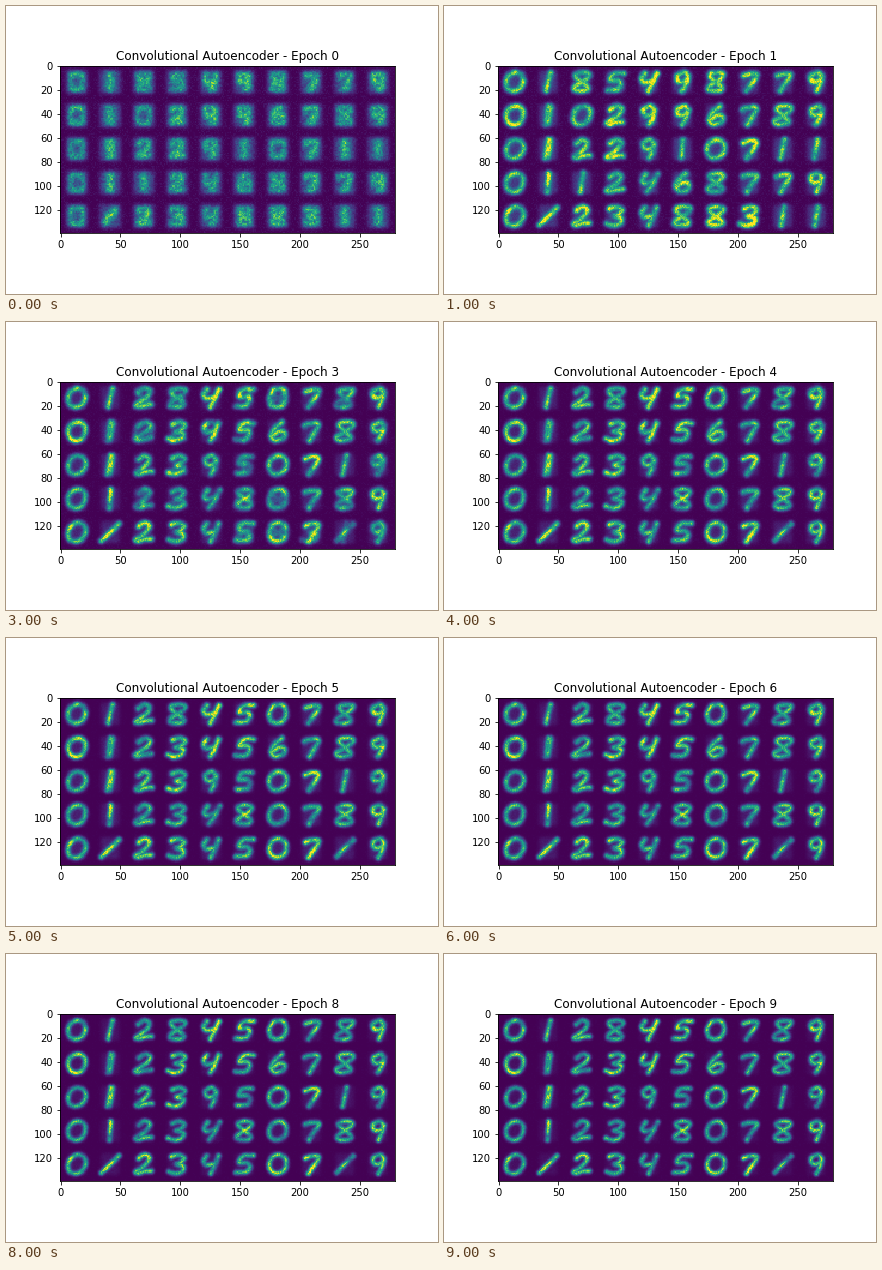
Animation, 432 px wide and 288 px high, one loop 10000 ms. Source, as a matplotlib script:

```python
import numpy as np
import matplotlib.pyplot as plt
from matplotlib.animation import FuncAnimation

CELL = 28
EPOCHS = 10
HALF_W, HALF_H = 7.2, 7.8  # half size of a digit's pen path, in cell pixels

# Shape read in each cell early and late in training ("I" is a bold one).
EARLY = ["0185498779", "0I02996789", "0I22910711", "0112468779", "0/23488311"]
LATE = ["0128450789", "0I23456789", "0I23950719", "0123480789", "0/234507/9"]

turn = np.linspace(0, 2 * np.pi, 25)
STROKES = {
    "0": [list(zip(np.sin(turn), -np.cos(turn)))],
    "1": [[(0, -1), (0, 1)]],
    "I": [[(-.12, -1), (-.12, 1)], [(.12, -1), (.12, 1)]],
    "/": [[(.8, -.9), (-.8, .9)]],
    "2": [[(-.7, -.6), (-.1, -1), (.55, -.7), (.35, -.1), (-.2, .4),
           (-.8, .85), (-.4, .95), (.2, .75), (1, .7)]],
    "3": [[(-.7, -.8), (0, -1), (.7, -.7), (.4, -.2), (-.1, 0)],
          [(-.1, 0), (.75, .25), (.6, .8), (-.1, 1), (-.9, .8)]],
    "4": [[(-.6, -.9), (-.85, -.3), (-.5, .05), (.2, 0), (.6, -.2)],
          [(.8, -.9), (.55, -.2), (.35, .4), (.1, 1)]],
    "5": [[(.9, -.9), (-.2, -.85), (-.6, -.2), (.3, -.15), (.7, .3),
           (.3, .85), (-.8, .9)]],
    "6": [[(.3, -1), (-.4, -.3), (-.7, .4), (-.2, .95), (.6, .8),
           (.8, .2), (.2, 0), (-.5, .4)]],
    "7": [[(-.8, -.65), (-.2, -.85), (.5, -.85), (.75, -.65), (.5, -.1),
           (.2, .4), (-.1, 1)]],
    "8": [list(zip(0.8 * np.sin(2 * turn), -np.cos(turn)))],
    "9": [[(.5, -.6), (0, -1), (-.7, -.6), (-.4, -.05), (.3, -.1),
           (.55, -.6), (.5, .2), (.2, 1)]],
}


def smooth(points, steps=14):
    """Catmull-Rom curve through the points."""
    p = np.array(points, float)
    p = np.vstack([2 * p[0] - p[1], p, 2 * p[-1] - p[-2]])
    t = np.linspace(0, 1, steps)[:, None]
    a, b, c, d = (p[k:len(p) - 3 + k, None] for k in range(4))
    curve = b + t * (c - a) / 2 + t**2 * (a - 2.5 * b + 2 * c - d / 2) \
        + t**3 * (1.5 * (b - c) + (d - a) / 2)
    return curve.reshape(-1, 2)


CURVES = {g: np.vstack([smooth(s) for s in strokes])
          for g, strokes in STROKES.items()}
yy, xx = np.mgrid[:CELL, :CELL] - (CELL - 1) / 2


def brush(glyph, slant, pen):
    """Ink left by a soft pen of the given radius along a slanted glyph."""
    x, y = CURVES[glyph].T
    px, py = x * HALF_W - slant * y * HALF_H, y * HALF_H
    dist = np.hypot(xx[..., None] - px, yy[..., None] - py).min(-1)
    return np.exp(-(dist / pen) ** 2)


def soft_box(w, h):
    def side(v, r):
        return 1 / (1 + np.exp(np.abs(v) - r))
    return side(xx, w) * side(yy, h)


def patches(rng, knots=7):
    """Smooth random field in 0..1 over one cell."""
    at, k = np.linspace(0, knots - 1, CELL), np.arange(knots)
    rows = np.array([np.interp(at, k, r) for r in rng.random((knots, knots))])
    return np.array([np.interp(at, k, c) for c in rows.T]).T


def cell_image(r, c, epoch):
    rng = np.random.default_rng(10 * r + c)
    gain, slant = rng.uniform(0.7, 1.0), rng.uniform(0.05, 0.25)
    tone, grain = patches(rng), rng.random((CELL, CELL))
    first, last = EARLY[r][c], LATE[r][c]

    if epoch == 0:
        blocks = np.kron(rng.random((14, 14)), np.ones((2, 2)))
        blob = brush(first, 0, 4) * soft_box(6.5, 8.5)
        level = 0.2 * soft_box(8.5, 9.5) + 0.5 * gain * blob
        return level * (0.6 + 0.4 * blocks + 0.4 * grain)

    late = np.interp(epoch, [1, 4], [0, 1])
    pen = np.interp(epoch, [1, 9], [2.5, 2.0])
    ink = (1 - late) * brush(first, slant, pen) + late * brush(last, slant, pen)
    haze = np.interp(epoch, [1, 3, 9], [0.16, 0.1, 0.04]) * soft_box(7.5, 9)
    level = ink * gain * (0.4 + 0.75 * tone) + haze
    return level * (0.8 + 0.35 * grain)


def picture(epoch):
    img = np.block([[cell_image(r, c, epoch) for c in range(10)]
                    for r in range(5)])
    rng = np.random.default_rng(70 + epoch)
    speckle = np.interp(epoch, [0, 5], [0.05, 0.01])
    return np.clip(img + speckle * rng.random(img.shape) ** 4, 0, 1)


plt.rcParams.update({"font.family": "DejaVu Sans", "font.size": 10})
fig = plt.figure(figsize=(6, 4), dpi=72, facecolor="white")
fig.subplots_adjust(left=0.125, right=0.9, bottom=0.125, top=0.88)
ax = fig.add_subplot()
image = ax.imshow(picture(0), cmap="viridis", vmin=0, vmax=1,
                  interpolation="nearest")
ax.set_xticks(range(0, 251, 50))
ax.set_yticks(range(0, 121, 20))
title = ax.set_title("", fontsize=12)


def update(epoch):
    image.set_data(picture(epoch))
    title.set_text(f"Convolutional Autoencoder - Epoch {epoch}")
    return image, title


anim = FuncAnimation(fig, update, frames=EPOCHS, interval=1000,
                     repeat=True, repeat_delay=0, blit=False)
plt.show()
```
